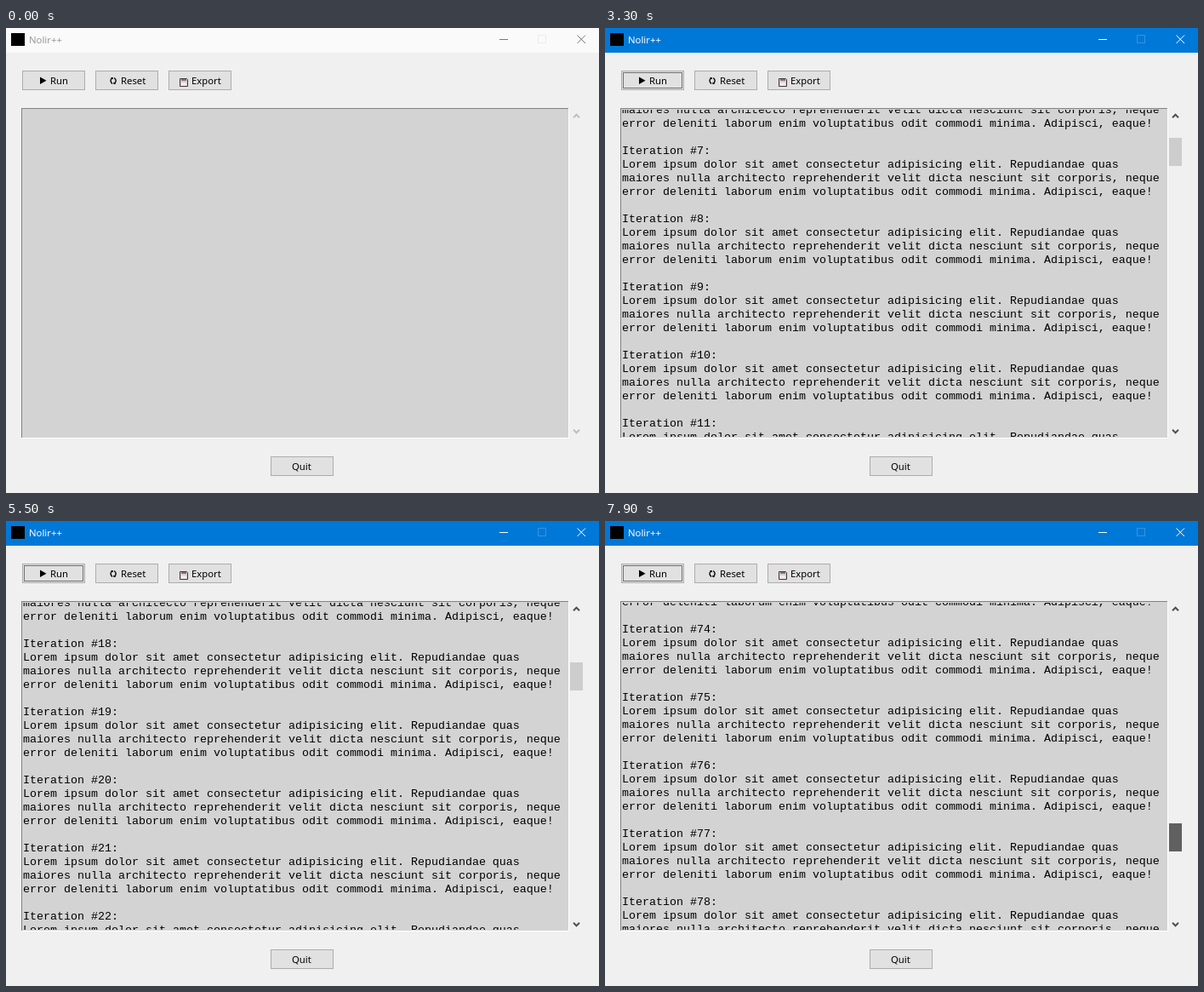
These frames come from a looping animation (697x546 px, 8 s). An HTML page:

```html
<!DOCTYPE html>
<html lang="en">
<head>
<meta charset="utf-8">
<title>Text printer window</title>
<style>
  html, body { margin: 0; width: 100%; height: 100%; overflow: hidden; background: #f0f0f0; }
  svg { display: block; width: 697px; height: 546px; }
  .ui { font: 11.3px "Segoe UI", "Open Sans", "Noto Sans", sans-serif; }
  .mono { font: 13.333px "Courier New", "Liberation Mono", monospace; white-space: pre; }
  .line { fill: none; }
  .button { fill: #e1e1e1; stroke: #adadad; }
  .hover { fill: #e5f1fb; stroke: #0078d7; }
  .pressed { fill: #cce4f7; stroke: #005499; }
</style>
</head>
<body>
<svg viewBox="0 0 697 546">
  <defs>
    <clipPath id="view"><rect x="19" y="96" width="642" height="384"/></clipPath>
  </defs>
  <rect width="697" height="546" fill="#f0f0f0"/>

  <!-- title bar -->
  <rect id="bar" width="697" height="29"/>
  <rect x="6" y="6" width="16" height="15"/>
  <text id="title" class="ui" x="27" y="18">Nolir++</text>
  <g id="controls" class="line">
    <path d="M580 13.5h10"/>
    <path d="M671.5 8.5l9.5 9.5M681 8.5l-9.5 9.5"/>
  </g>
  <rect id="maximise" class="line" x="625.5" y="8.5" width="9" height="9"/>

  <!-- buttons -->
  <g class="ui">
    <rect id="run" class="button" x="19.5" y="50.5" width="73" height="22"/>
    <rect id="focus" class="line" x="21.5" y="52.5" width="69" height="18" stroke="#000" stroke-dasharray="1 1"/>
    <path d="M40 57.5l7.5 4.2l-7.5 4.2z"/>
    <text x="52" y="66">Run</text>

    <rect class="button" x="105.5" y="50.5" width="73" height="22"/>
    <path class="line" stroke="#000" stroke-width="1.4" d="M125 58.5q-4 3.2 0 7M127.2 58.5q4 3.2 0 7"/>
    <path d="M123 58h2.8v2.6zM129.2 66h-2.8v-2.6z"/>
    <text x="135" y="66">Reset</text>

    <rect class="button" x="191.5" y="50.5" width="73" height="22"/>
    <path fill="#d8cdd4" stroke="#41363c" d="M204.5 59.5h8l1 1v8h-9z"/>
    <path fill="#85757e" d="M206 60h6v2h-6z"/>
    <path fill="#f1e9ed" d="M206 64h6v4h-6z"/>
    <text x="218" y="66">Export</text>

    <rect class="button" x="311.5" y="503.5" width="73" height="22"/>
    <text x="336" y="519">Quit</text>
  </g>

  <!-- text area -->
  <rect x="18" y="94" width="644" height="388" fill="#fff"/>
  <path fill="#828282" d="M18 94h643v1h-642v386h-1z"/>
  <rect x="19" y="95" width="642" height="386" fill="#d3d3d3"/>
  <g clip-path="url(#view)"><g id="lines" class="mono"></g></g>

  <!-- scrollbar -->
  <rect id="thumb" x="663" width="15"/>
  <g id="arrows" class="line" stroke-width="2">
    <path d="M667 105.2l3.5 -3.5l3.5 3.5"/>
    <path d="M667 471.8l3.5 3.5l3.5 -3.5"/>
  </g>
</svg>
<script>
  const LOOP = 8000;
  const COUNT = 100;
  const LINE = 16;
  const $ = id => document.getElementById(id);

  const body = [
    "Lorem ipsum dolor sit amet consectetur adipisicing elit. Repudiandae quas",
    "maiores nulla architecto reprehenderit velit dicta nesciunt sit corporis, neque",
    "error deleniti laborum enim voluptatibus odit commodi minima. Adipisci, eaque!"
  ];

  function addLine(text, row) {
    const el = document.createElementNS("http://www.w3.org/2000/svg", "text");
    el.setAttribute("x", 20);
    el.setAttribute("y", 108 + row * LINE);
    el.textContent = text;
    $("lines").append(el);
  }
  for (let n = 0; n < COUNT; n++) {
    [`Iteration #${n + 1}:`, ...body].forEach((text, i) => addLine(text, n * 5 + i));
  }

  // [time, value]: each value holds until the next step
  const scrollSteps = [
    [0, 0], [2500, 40], [2600, 160], [2700, 240], [3000, 320], [3100, 400],
    [3300, 440], [3400, 520], [3500, 640], [3800, 760], [3900, 840],
    [4200, 960], [4300, 1080], [4700, 1200], [5200, 1280], [5500, 1320],
    [5600, 1360], [6000, 1440],
    [7300, 1630], [7400, 2225], [7500, 2962], [7600, 3700], [7700, 4460],
    [7800, 5170], [7900, 5817]
  ];
  const runSteps = [
    [0, "button"], [700, "button hover"], [1100, "button pressed"],
    [1200, "button hover"], [1400, "button"]
  ];
  const thumbSteps = [[0, "none"], [1200, "#cdcdcd"], [7100, "#a6a6a6"], [7300, "#606060"]];
  const sizeSteps = [[0, 43], [1500, 33]];

  const at = (steps, t) => steps.findLast(step => step[0] <= t)[1];
  const set = (id, name, value) => $(id).setAttribute(name, value);

  function draw(t) {
    const active = t >= 1100;
    const printed = t >= 1200;
    const scroll = at(scrollSteps, t);

    set("bar", "fill", active ? "#0078d7" : "#fafafa");
    set("title", "fill", active ? "#fff" : "#999");
    set("controls", "stroke", active ? "#fff" : "#777");
    set("maximise", "stroke", active ? "#3394e0" : "#ececec");
    set("run", "class", at(runSteps, t));
    set("focus", "visibility", active ? "visible" : "hidden");

    set("lines", "visibility", printed ? "visible" : "hidden");
    set("lines", "transform", `translate(0 ${-scroll})`);
    set("arrows", "stroke", printed ? "#505050" : "#bfbfbf");
    set("thumb", "fill", at(thumbSteps, t));
    set("thumb", "y", Math.round(110.4 + scroll * 0.0421));
    set("thumb", "height", at(sizeSteps, t));
  }

  const start = performance.now();
  function tick() {
    draw((performance.now() - start) % LOOP);
    requestAnimationFrame(tick);
  }
  tick();
</script>
</body>
</html>
```
